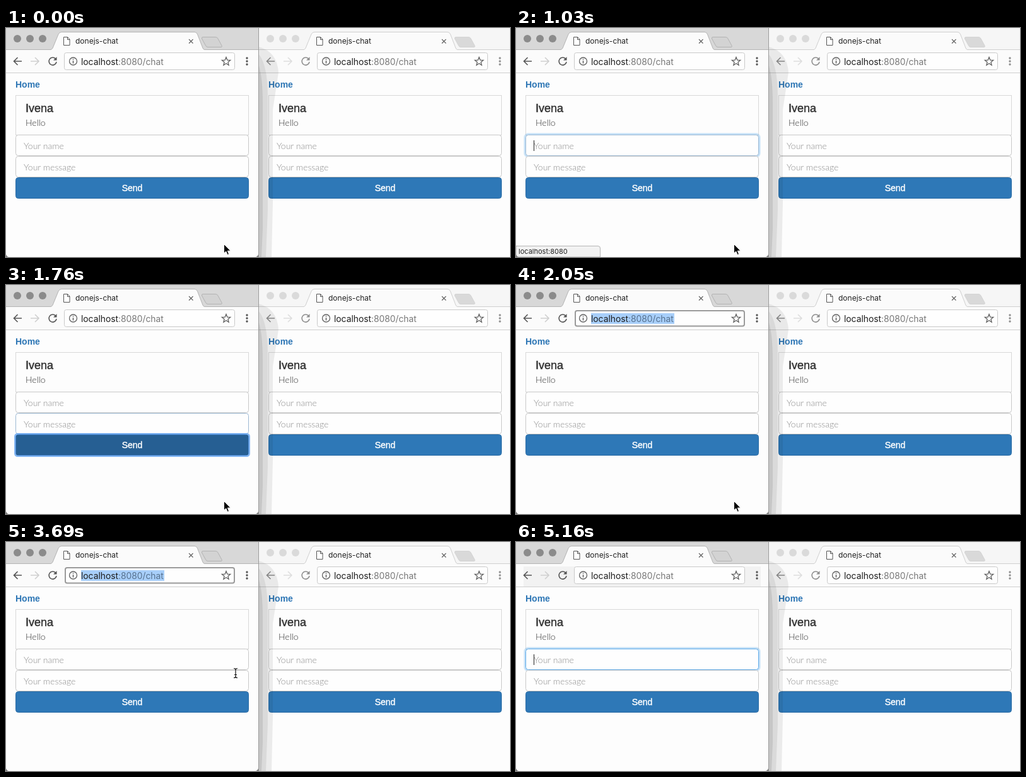
Write an HTML page that moves like this. It is 799 px wide and 365 px high and loops after 5460 ms.

```html
<!DOCTYPE html>
<html lang="en">
<head>
<meta charset="utf-8">
<title>Chat demo</title>
<style>
  html, body { margin: 0; height: 100%; overflow: hidden; background: #fdfdfd; }
  svg { display: block; width: 799px; height: 365px; }
  text { font: 14px "Liberation Sans", Arial, sans-serif; white-space: pre; }
  .ui { font-family: Inter, sans-serif; }
  .tab { font-size: 12px; }
  .url { font-size: 13.8px; }
  .status { font-size: 11px; }
  .home { font-weight: bold; fill: #2d76b5; }
  .name { font-size: 18px; fill: #333; stroke: #333; stroke-width: .5; }
  .light { font-family: Lato, sans-serif; font-weight: 300; fill: #333; }
  .hint { fill: #8c8c8c; }
  .send { fill: #fff; stroke: #fff; stroke-width: .4; text-anchor: middle; }
  .line { fill: none; stroke-width: 1.6; }
  .glow { fill: none; stroke: #66afe9; }
  .ring { fill: none; stroke: #5b9ff0; stroke-width: 3; stroke-opacity: .75; }
</style>
</head>
<body>
<svg viewBox="0 0 799 365"></svg>
<script>
const LOOP = 5460;
const svg = document.querySelector('svg');

const rect = (x, y, w, h, attrs = '') =>
  `<rect x="${x}" y="${y}" width="${w}" height="${h}" ${attrs}/>`;
const text = (x, y, cls, content, attrs = '') =>
  `<text x="${x}" y="${y}" class="${cls}" ${attrs}>${content}</text>`;
const dots = (points, r, fill) =>
  points.map(([x, y]) => `<circle cx="${x}" cy="${y}" r="${r}" fill="${fill}"/>`).join('');

function field(y, id, hint) {
  return `<g class="${id}-glow glow" visibility="hidden">
      ${rect(14.5, y - .5, 371, 35, 'rx="5" stroke-width="5" stroke-opacity=".16"')}
      ${rect(14.5, y - .5, 371, 35, 'rx="5" stroke-width="3" stroke-opacity=".25"')}
    </g>
    ${rect(15.5, y + .5, 369, 33, `class="${id}" rx="4" fill="#fefefe" stroke="#c8c8c8"`)}
    ${text(28, y + 23, 'light hint', hint)}`;
}

function browser(active) {
  const ink = active ? '#555' : '#8f8f8f';
  const pale = active ? '#cfcfcf' : '#dedede';
  const edge = active ? '#b4b4b4' : '#cfcfcf';
  const bar = active ? '#d8d8d8' : '#f6f6f6';
  const star = Array.from({ length: 10 }, (_, i) => {
    const a = i * Math.PI / 5, r = i % 2 ? 3 : 7;
    return `${(349 + r * Math.sin(a)).toFixed(1)},${(53.5 - r * Math.cos(a)).toFixed(1)}`;
  }).join(' ');
  return `
    ${rect(0, 0, 400, 365, 'fill="#fdfdfd"')}
    ${rect(0, 0, 400, 35, `fill="${bar}"`)}
    ${dots([[18, 17], [38, 17], [58, 17]], 6, active ? '#8b8b8b' : '#dadada')}
    <path d="M0 34.5H71Q73 34 74 32L83 10Q84.500 6.500 88 6.500H299Q302 6.500 303.500 10L312 32Q313 34.500 315 34.500H400V36H0Z" fill="#fbfbfb"/>
    <path d="M0 34.500H71Q73 34 74 32L83 10Q84.500 6.500 88 6.500H299Q302 6.500 303.500 10L312 32Q313 34.500 315 34.500H400" fill="none" stroke="${edge}"/>
    <path d="M312 14.500H332Q335 14.500 336 17L342 28Q343 30.500 341 30.500H320Q317.500 30.500 316.500 28L310.500 17Q310 14.500 312 14.500Z"
      fill="${active ? '#d3d3d3' : '#d9d9d9'}" stroke="${active ? '#b3b3b3' : '#d3d3d3'}"/>
    <path d="M91.500 14.500H97.500L101 18V27.500H91.500ZM97.500 14.500V18.500H101" fill="#fff" stroke="#555"/>
    ${text(110, 25, 'ui tab', 'donejs-chat', 'fill="#222"')}
    <path d="M290 18L296.500 24.500M296.500 18L290 24.500" stroke="#666" stroke-width="1.3"/>

    ${rect(0, 35, 400, 36, 'fill="#fbfbfb"')}
    ${rect(12, 39, 376, 32, 'class="toolbar" fill="#f2f2f2" visibility="hidden"')}
    ${rect(0, 71, 400, 1, 'fill="#cfcfcf"')}
    <path class="line" d="M25 53H12.500M18.500 47L12.500 53L18.500 59" stroke="${ink}"/>
    <path class="line" d="M39 53H52M46 47L52 53L46 59" stroke="${pale}"/>
    <path class="line" d="M78.500 49A6 6 0 1 0 80 54" stroke="${ink}"/>
    <path d="M80.500 46V51.500H75Z" fill="${ink}"/>
    ${rect(92.5, 39.5, 270, 27, 'class="address" rx="3" fill="#fefefe" stroke="#c9c9c9"')}
    <circle class="line" cx="106.500" cy="53" r="6" stroke="#606060" style="stroke-width:1.300"/>
    <path d="M106.500 49V50.500M106.500 52V56.500" stroke="#606060" stroke-width="1.500"/>
    ${rect(119, 45, 132, 17, 'class="selection" fill="#a8cffa" visibility="hidden"')}
    ${text(119, 59, 'ui url', 'localhost<tspan class="path" fill="#777">:8080/chat</tspan>', 'fill="#1c1c1c"')}
    <polygon points="${star}" fill="none" stroke="#5f5f5f" stroke-width="1.300"/>
    ${dots([[382, 48], [382, 53], [382, 58]], 1.7, ink)}

    ${text(15, 95, 'home', 'Home')}
    ${rect(14.5, 80.5, 39, 18, 'class="ring home-ring" rx="2" visibility="hidden"')}
    ${rect(15.5, 107.5, 369, 63, 'fill="none" stroke="#d9d9d9"')}
    ${text(31, 134, 'name', 'Ivena')}
    ${text(31, 156, 'light', 'Hello')}
    ${field(170, 'user', 'Your name')}
    ${field(204, 'message', 'Your message')}
    ${rect(15.5, 238.5, 369, 33, 'class="button" rx="4" fill="#2e78b7" stroke="#2b6ca5"')}
    ${rect(14.5, 237.5, 371, 35, 'class="ring send-ring" rx="4" visibility="hidden"')}
    ${text(200, 260, 'send', 'Send')}`;
}

svg.innerHTML = `
  <g transform="translate(401)">${browser(false)}</g>
  <g fill="#000">
    <path d="M401 30Q430 38 432 71L423 130V280L421 365H401Z" fill-opacity=".07"/>
    <path d="M401 42Q415 60 415 110V290L412 365H401Z" fill-opacity=".07"/>
    <path d="M401 60Q407 80 407 120V320L405 365H401Z" fill-opacity=".09"/>
  </g>
  <g id="left">
    ${browser(true)}
    <path class="caret" d="M28.500 179V196" stroke="#222"/>
    <g class="status-bar">
      <path d="M0 347.500H130Q133.500 347.500 133.500 351V365H0Z" fill="#f2f2f2" stroke="#b5b5b5"/>
      ${text(4, 360, 'ui status', 'localhost:8080', 'fill="#222"')}
    </g>
    <path d="M400.500 0V365" stroke="#9c9c9c"/>
    <path d="M0 361V365H4Q1 364 0 361ZM400 361V365H396Q399 364 400 361Z" fill="#777"/>
  </g>
  <path id="arrow" d="M0 0V14.500L3.300 11.500L5.600 17L8 16L5.800 10.700H10.500Z" fill="#000" stroke="#fff"/>
  <g id="beam" fill="none">
    <path d="M-3-7.500Q0-7.500 0-5.500V5.500Q0 7.500-3 7.500M3-7.500Q0-7.500 0-5.500M0 5.500Q0 7.500 3 7.500M-2 2.500H2" stroke="#111" stroke-width="1.200"/>
  </g>`;

const part = name => svg.querySelector('#left .' + name);
const arrow = svg.querySelector('#arrow');
const beam = svg.querySelector('#beam');
const set = (node, attrs) => {
  for (const key in attrs) node.setAttribute(key, attrs[key]);
};
const show = (node, on) => set(node, { visibility: on ? 'visible' : 'hidden' });

// Start time, pointer kind and position
const pointer = [
  [0, arrow, 345.5, 344.5], [3540, beam, 364.5, 226], [3690, beam, 364, 209],
  [3830, beam, 337.5, 200], [4420, beam, 341.5, 199], [4570, beam, 381, 199],
  [4720, arrow, 386, 185], [4860, arrow, 578, 202], [5010, null, 0, 0]
];

function draw(t) {
  const within = (from, to = LOOP) => t >= from && t < to;
  const border = (...fades) =>
    fades.some(from => within(from, from + 145)) ? '#9db9d3' : null;

  const userFocus = within(1030, 1320) || within(4130);
  const messageFocus = within(1320, 1760);
  const addressFocus = within(2050, 4130);
  const sendFocus = within(1760, 2050);

  show(part('home-ring'), within(600, 1030));
  show(part('user-glow'), userFocus);
  show(part('message-glow'), messageFocus);
  set(part('user'), { stroke: border(1030, 1320, 4130) || (userFocus ? '#5fabe8' : '#c8c8c8') });
  set(part('message'), { stroke: border(1320, 1760) || (messageFocus ? '#5fabe8' : '#c8c8c8') });

  show(part('caret'), userFocus && !within(4570, 5160) || messageFocus);
  set(part('caret'), { transform: `translate(0 ${messageFocus ? 34 : 0})` });

  const dark = sendFocus || within(3540, 3690);
  set(part('button'), { fill: dark ? '#265f93' : '#2e78b7', stroke: dark ? '#204d74' : '#2b6ca5' });
  show(part('send-ring'), sendFocus);

  show(part('selection'), addressFocus);
  set(part('address'), addressFocus
    ? { x: 94, y: 41, width: 268, height: 24.5, stroke: '#9a9a9a', 'stroke-width': 2 }
    : { x: 92.5, y: 39.5, width: 270, height: 27, stroke: '#c9c9c9', 'stroke-width': 1 });
  set(part('path'), { fill: addressFocus ? '#56718e' : '#777' });
  show(part('toolbar'), within(4130));
  set(part('status-bar'), { opacity: within(740, 1320) ? 1 : within(1320, 1470) ? .5 : 0 });

  const [, kind, x, y] = pointer.findLast(([start]) => t >= start);
  for (const node of [arrow, beam]) show(node, node === kind);
  if (kind) set(kind, { transform: `translate(${x} ${y})` });
}

function tick() {
  draw(performance.now() % LOOP);
  requestAnimationFrame(tick);
}
tick();
</script>
</body>
</html>
```
